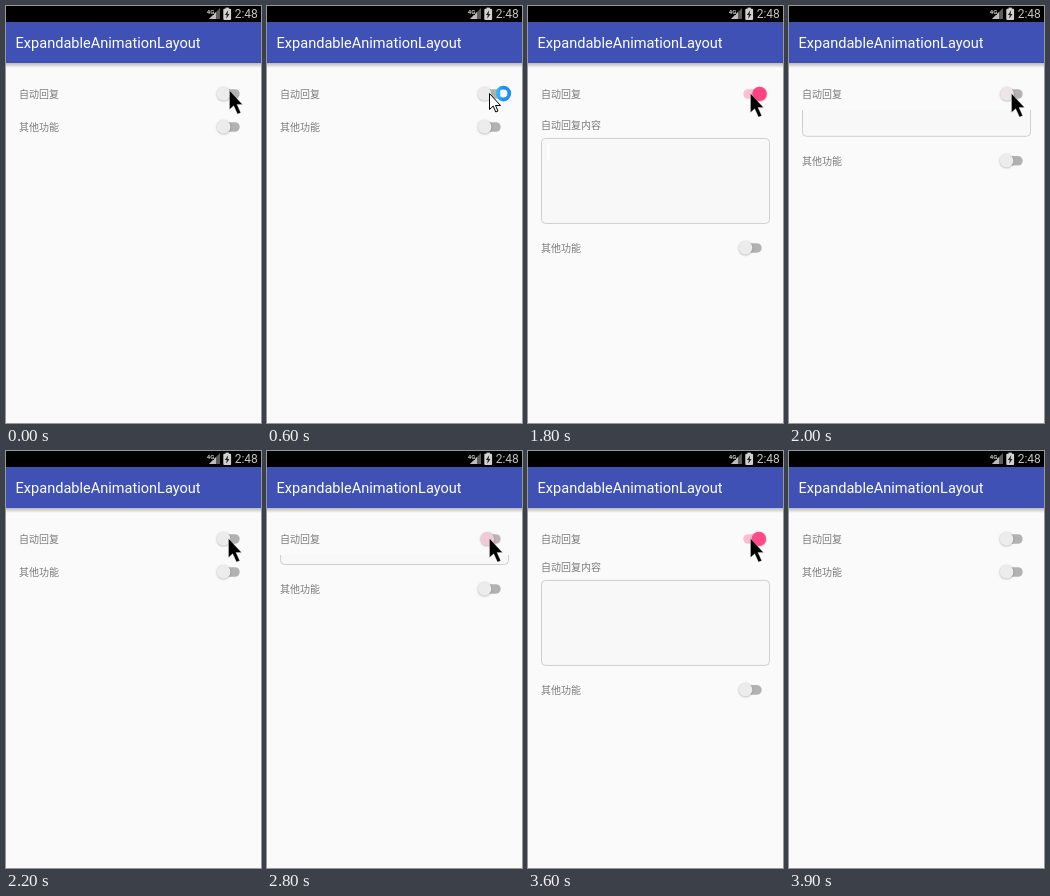
An HTML page with a canvas for the animation above (4300 ms loop, 255 by 417 pixels).

```html
<!DOCTYPE html>
<html lang="zh-CN">
<head>
<meta charset="utf-8">
<title>Expandable layout</title>
<style>
  html, body { margin: 0; height: 100%; overflow: hidden; background: #fafafa; }
  canvas { display: block; width: 255px; height: 417px; }
</style>
</head>
<body>
<canvas id="stage" width="255" height="417"></canvas>
<script>
const ctx = document.getElementById('stage').getContext('2d');
const LOOP = 4300, STEP = 100;          // the screen refreshes ten times a second
const PANEL_TOP = 104, PANEL_HEIGHT = 122;
const TOGGLES = [727, 1780, 2727, 3560]; // taps: open, close, open, close
const CJK = '10px "Noto Sans CJK SC", "Noto Sans CJK", sans-serif';

const ease = x => (1 - Math.cos(Math.PI * Math.min(1, Math.max(0, x)))) / 2;

// 0 = closed, 1 = open; each tap eases towards the other state
const progress = (t, opening, closing) => TOGGLES.reduce((sum, start, i) =>
  i % 2 ? sum - ease((t - start) / closing) : sum + ease((t - start) / opening), 0);

const mix = (a, b, p) => `rgb(${a.map((v, i) => Math.round(v + (b[i] - v) * p))})`;

function rect(x, y, w, h, color) {
  ctx.fillStyle = color;
  ctx.fillRect(x, y, w, h);
}

function text(str, x, y, font, color) {
  ctx.font = font;
  ctx.fillStyle = color;
  ctx.fillText(str, x, y);
}

function roundRect(x, y, w, h, r, fill) {
  ctx.beginPath();
  ctx.roundRect(x, y, w, h, r);
  ctx.fillStyle = fill;
  ctx.fill();
}

function polygon(points, fill) {
  ctx.beginPath();
  points.forEach(([x, y]) => ctx.lineTo(x, y));
  ctx.closePath();
  ctx.fillStyle = fill;
  ctx.fill();
}

function statusBar() {
  rect(0, 0, 255, 16, '#000');
  polygon([[214, 2], [214, 13], [203, 13]], '#5c5c5c');
  polygon([[210, 6], [210, 13], [203, 13]], '#bdbdbd');
  rect(200, 1, 8, 8, '#000');
  text('4G', 200.8, 7.5, 'bold 6px Roboto, sans-serif', '#ccc');
  roundRect(217.3, 2.8, 7.8, 11.2, 1, '#d2d2d2');
  rect(219.5, 1.6, 3.4, 1.4, '#d2d2d2');
  polygon([[222.2, 4.3], [218.9, 9], [220.8, 9], [220.2, 12.8], [223.5, 8], [221.6, 8]], '#222');
  text('2:48', 228.7, 12, '12px Roboto, sans-serif', '#c4c4c4');
}

function appBar() {
  const shadow = ctx.createLinearGradient(0, 57, 0, 62);
  shadow.addColorStop(0, 'rgba(0,0,0,.26)');
  shadow.addColorStop(1, 'rgba(0,0,0,0)');
  rect(0, 57, 255, 5, shadow);
  rect(0, 16, 255, 41, '#3f51b5');
  text('ExpandableAnimationLayout', 9.6, 42.3, '14.55px Roboto, sans-serif', '#fff');
}

function toggle(y, on) {
  roundRect(215.3, y - 4.8, 18.4, 9.6, 4.8, mix([178, 178, 178], [255, 190, 210], on));
  ctx.save();
  ctx.shadowColor = 'rgba(0,0,0,.3)';
  ctx.shadowBlur = 2;
  ctx.shadowOffsetY = 0.5;
  ctx.beginPath();
  ctx.arc(217.6 + 14.2 * on, y - 0.1, 6.8 + 0.4 * on, 0, 7);
  ctx.fillStyle = mix([236, 236, 236], [255, 64, 129], on);
  ctx.fill();
  ctx.restore();
}

function row(label, y, on) {
  text(label, 13, y + 4, CJK, '#7b7b7b');
  toggle(y, on);
}

function panel(open, caretOn) {
  ctx.save();
  ctx.beginPath();
  ctx.rect(0, PANEL_TOP, 255, open);
  ctx.clip();
  ctx.translate(0, open - PANEL_HEIGHT);
  text('自动回复内容', 13, 124, CJK, '#7b7b7b');
  roundRect(13.5, 133.5, 228, 85, 4, '#f8f8f8');
  ctx.strokeStyle = '#cfcfcf';
  ctx.lineWidth = 1;
  ctx.stroke();
  if (caretOn) rect(19.3, 139.5, 2.7, 15, '#fff');
  ctx.restore();
}

function pointer(t) {
  if (t >= 3900) return;
  const busy = t >= 600 && t < 1100;
  ctx.save();
  ctx.translate(222.5, 87.5);
  if (t < 100) ctx.translate(1, -3);
  ctx.lineWidth = 1;
  if (busy) {
    polygon([[0, 0], [0, 16], [3.7, 12.6], [6.3, 18.5], [8.5, 17.5], [6, 12], [11, 12]], '#fff');
    ctx.strokeStyle = '#000';
    ctx.stroke();
    const blue = ctx.createLinearGradient(6, 0, 22, 0);
    blue.addColorStop(0, '#36c4f5');
    blue.addColorStop(0.5, '#1e90ef');
    blue.addColorStop(1, '#2490f0');
    ctx.beginPath();
    ctx.arc(13.9, 0.1, 5.9, 0, 7);
    ctx.strokeStyle = blue;
    ctx.lineWidth = 3.8;
    ctx.stroke();
  } else {
    polygon([[0, 0], [0, 19], [4.2, 15.2], [8, 23.5], [11.2, 22.2], [7.5, 14], [13, 14]], '#000');
    ctx.strokeStyle = 'rgba(255,255,255,.55)';
    ctx.lineWidth = 0.5;
    ctx.stroke();
  }
  ctx.restore();
}

function draw(now) {
  const t = Math.floor(now % LOOP / STEP) * STEP;
  const open = PANEL_HEIGHT * progress(t, 300, 340);
  rect(0, 0, 255, 417, '#fafafa');
  appBar();
  statusBar();
  row('自动回复', 88, progress(t, 250, 250));
  panel(open, t >= 1300 && t < 1900);
  row('其他功能', 121 + open, 0);
  pointer(t);
}

const begin = performance.now();
function frame() {
  draw(performance.now() - begin);
  requestAnimationFrame(frame);
}
frame();
</script>
</body>
</html>
```
